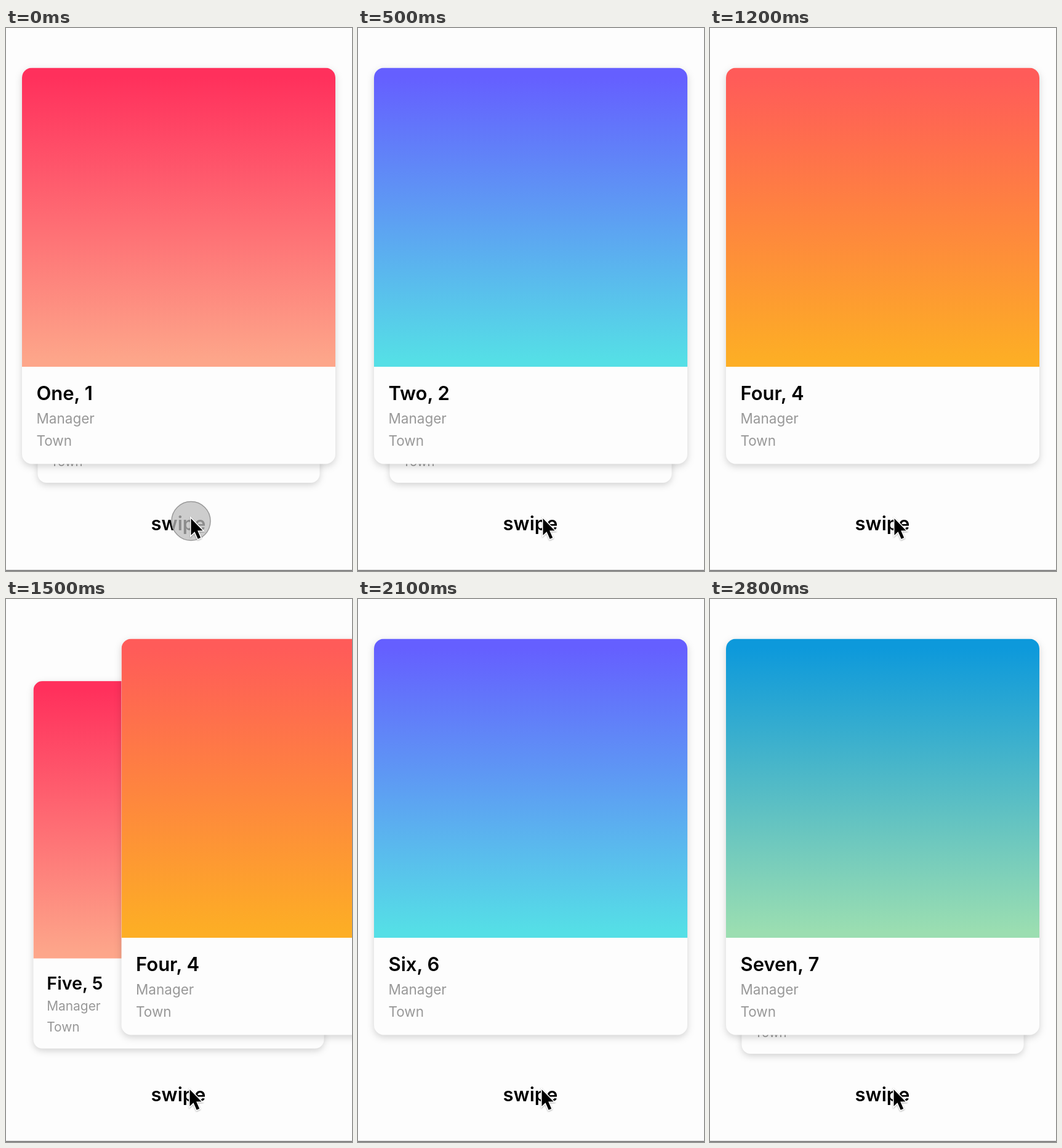
These frames come from a looping animation (562 by 880 pixels, 2.9 s). An HTML page:

```html
<!DOCTYPE html>
<html lang="en">
<head>
<meta charset="utf-8">
<title>Card stack</title>
<style>
  html, body { margin: 0; width: 100%; height: 100%; overflow: hidden; background: #fdfdfd; }
  svg { display: block; width: 562px; height: 880px; }
  text { font-family: Inter, sans-serif; }
  .bold { font-size: 31px; font-weight: 600; fill: #000; }
  .note { font-size: 22.5px; fill: #989898; }
  .body { filter: drop-shadow(0 4px 6px rgba(0, 0, 0, .17)); }
</style>
</head>
<body>
<svg viewBox="0 0 562 880">
  <defs id="defs">
    <clipPath id="round"><rect width="509" height="642" rx="16"/></clipPath>
  </defs>
  <rect width="562" height="880" fill="#fdfdfd"/>
  <text class="bold" x="280" y="814" text-anchor="middle">swipe</text>
  <g id="cards"></g>
  <rect y="878.3" width="562" height="1.7" fill="#7b7b7b"/>
  <g id="pointer">
    <circle id="press" cy="4" r="31.5" fill="#bdbdbd" fill-opacity=".74" stroke="#999" stroke-width="1.5"/>
    <path d="M0 0V27L6 21.300L11.200 33L15.700 31L10.600 19.500H19Z" fill="#000" stroke="#fff" stroke-width="3"
      paint-order="stroke" style="filter:drop-shadow(0 1px 1px rgba(0,0,0,.3))"/>
  </g>
</svg>
<script>
const LOOP = 2900, STEP = 100, SLIDE = 145, REFILL = 60;
const CARD = { x: 26, y: 64.5, w: 509, h: 642 };
const taps = [45, 582, 1045, 1450, 1945, 2545];
const names = ["One", "Two", "Three", "Four", "Five", "Six", "Seven", "Eight"];
const tints = [["#ff305c", "#fda68a"], ["#655fff", "#55dfe6"], ["#0d99db", "#9bdeb1"], ["#ff5b59", "#fdae25"]];

const byId = id => document.getElementById(id);
const clamp = v => Math.max(0, Math.min(1, v));
const ease = v => v * v * (3 - 2 * v);

byId("defs").innerHTML += tints.map(([top, end], i) =>
  `<linearGradient id="tint${i}" x2="0" y2="1"><stop offset=".03" stop-color="${top}"/><stop offset=".98" stop-color="${end}"/></linearGradient>`
).join("");

// Later cards lie underneath, so they are drawn first.
byId("cards").innerHTML = names.map((name, i) => `<g id="card${i}">
  <rect class="body" width="${CARD.w}" height="${CARD.h}" rx="16" fill="#fdfdfd"/>
  <rect width="${CARD.w}" height="484.500" fill="url(#tint${i % 4})" clip-path="url(#round)"/>
  <text class="bold" x="23.500" y="538.500">${name}, ${i + 1}</text>
  <text class="note" x="23.500" y="576">Manager</text>
  <text class="note" x="23.500" y="612">Town</text></g>`).reverse().join("");
const cards = names.map((_, i) => byId("card" + i));

// rise: 0 = waiting behind, 1 = in front; away: 0 = in place, 1 = off the right side
function place(i, rise, away) {
  const scale = 0.9 + 0.1 * rise;
  const x = CARD.x + CARD.w * (1 - scale) / 2 + 588 * away;
  const y = CARD.y + CARD.h * (1 - scale) / 2 + 62.5 * (1 - rise);
  cards[i].style.display = "";
  cards[i].setAttribute("transform", `translate(${x} ${y}) scale(${scale})`);
}

function draw(t) {
  const top = taps.filter(s => s <= t).length;
  const since = top ? t - taps[top - 1] : Infinity;
  const p = ease(clamp(since / SLIDE));
  cards.forEach(c => c.style.display = "none");
  place(top, p, 0);
  if (p < 1) place(top - 1, 1, p);
  if (since >= SLIDE + REFILL) place(top + 1, 0, 0);

  const pressed = taps.some(s => t >= s - 80 && t <= s + 20);
  byId("press").style.display = pressed ? "" : "none";
  const x = t < 1000 ? 300.5 : t < 1400 ? 299.5 : 298.5;
  byId("pointer").setAttribute("transform", `translate(${x} 795)`);
}

const start = performance.now();
function tick() {
  const t = (performance.now() - start) % LOOP;
  draw(Math.floor(t / STEP) * STEP);
  requestAnimationFrame(tick);
}
draw(0);
requestAnimationFrame(tick);
</script>
</body>
</html>
```
